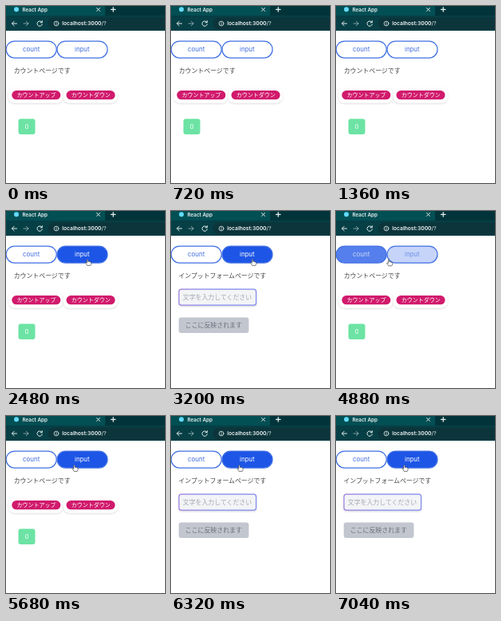
Animation of 199x222 px, one loop 7120 ms. Source, as an HTML page:

```html
<!DOCTYPE html>
<html lang="ja">
<head>
<meta charset="utf-8">
<title>React App</title>
<style>
  html, body { margin: 0; width: 100%; height: 100%; overflow: hidden; background: #fff; }
  svg { display: block; width: 100%; height: 100%; }
  text { font-family: Inter, "Noto Sans CJK JP", "Noto Sans CJK", sans-serif; font-size: 7.9px; }
  .mid { text-anchor: middle; }
  .icon { fill: none; stroke: #e3eeee; stroke-width: 1; stroke-linecap: round; stroke-linejoin: round; }
  .label { font-size: 7px; font-weight: 500; fill: #fff; }
  .pill rect { fill: #1d55e6; stroke: #4070e4; stroke-width: 1.2; }
  .card { fill: #fff; filter: url(#shadow); }
</style>
</head>
<body>
<svg viewBox="0 0 199 222" preserveAspectRatio="none">
  <defs>
    <filter id="shadow" x="-20%" y="-40%" width="140%" height="200%">
      <feDropShadow dx="0" dy="1" stdDeviation="1" flood-color="#000" flood-opacity=".16"/>
    </filter>
    <linearGradient id="edge">
      <stop stop-color="#9a7de0"/><stop offset=".4" stop-color="#7f88ee"/><stop offset="1" stop-color="#7f88ee"/>
    </linearGradient>
  </defs>
  <rect width="199" height="222" fill="#fff"/>

  <g id="browser">
    <rect width="199" height="31" fill="#063f45"/>
    <rect width="124" height="12" fill="#024f54"/>
    <rect x="124" width="75" height="12" fill="#01343a"/>
    <path d="M199 14.5H60a7.5 7.5 0 0 0 0 15H199Z" fill="#0c353b"/>
    <circle cx="13" cy="4.3" r="3" fill="#61dafb"/>
    <text x="20.5" y="6.6" style="font-size:6.3px;font-weight:600" fill="#eef4f4">React App</text>
    <path class="icon" d="M113.5 2.4l4 4m0-4l-4 4"/>
    <path class="icon" d="M131.5 4.4h5.4m-2.7-2.7v5.4" style="stroke-width:1.3"/>
    <path class="icon" d="M13.5 22H7.5m2.7-2.8L7.4 22l2.8 2.8"/>
    <path class="icon" d="M22 22h6m-2.7-2.8L28.1 22l-2.8 2.8" opacity=".55"/>
    <path class="icon" d="M44.8 20.2a3.2 3.2 0 1 0 .5 2.8M45.3 18.6v2.2h-2.2"/>
    <circle class="icon" cx="63" cy="22" r="2.9" style="stroke-width:.8"/>
    <path class="icon" d="M63 21.8v1.7M63 20.4v.1" style="stroke-width:.8"/>
    <text x="70.3" y="24.3" style="font-size:6.7px;font-weight:600" fill="#f1f6f6">localhost:3000<tspan fill="#b8c8c8">/?</tspan></text>
  </g>

  <g class="pill" id="countTab">
    <rect x=".2" y="44.1" width="63" height="21" rx="10.5"/>
    <text class="mid" x="31.7" y="57.4">count</text>
  </g>
  <g class="pill" id="inputTab">
    <rect x="64" y="44.1" width="63" height="21" rx="10.5"/>
    <text class="mid" x="95.3" y="57.4">input</text>
  </g>

  <g id="countPage">
    <text x="9.7" y="84" fill="#444">カウントページです</text>
    <rect class="card" x="3" y="102" width="68" height="19.5" rx="8"/>
    <rect class="card" x="71.5" y="102" width="68" height="19.5" rx="8"/>
    <rect x="7.3" y="106" width="61" height="11.3" rx="5.6" fill="#d11a6c"/>
    <rect x="75.5" y="106" width="61" height="11.3" rx="5.6" fill="#d11a6c"/>
    <text class="label mid" x="38" y="114.2">カウントアップ</text>
    <text class="label mid" x="106.3" y="114.2">カウントダウン</text>
    <rect x="15.5" y="141.5" width="21" height="19.5" rx="3" fill="#6ce3a4"/>
    <text class="mid" x="26" y="154.2" fill="#fff">0</text>
  </g>

  <g id="inputPage">
    <text x="9.4" y="84" fill="#444">インプットフォームページです</text>
    <rect x="10" y="98.2" width="96.5" height="20" rx="3" fill="#f3f4f6" stroke="url(#edge)" stroke-width="1.2" filter="url(#shadow)"/>
    <text x="14.8" y="111" fill="#a4a8b0">文字を入力してください</text>
    <rect x="9.7" y="133.5" width="87.7" height="19.5" rx="3" fill="#c2c6cf"/>
    <text x="17.8" y="146" fill="#6b727e">ここに反映されます</text>
  </g>

  <g id="cursor" stroke-linejoin="round">
    <path id="arrow" d="M0 0V9.4L2.2 7.4L3.7 10.8L5.2 10.1L3.7 6.9H6.7Z" fill="#111" stroke="#fff" stroke-width=".8"/>
    <path id="hand" d="M-.9 .8Q0-.7.9.8V3.6Q2.2 2.7 2.7 4Q4 3.3 4.4 4.6Q5.9 4.2 5.9 5.8Q5.9 8 4.6 9.9H-.4Q-1.5 8-2.9 6.3Q-3.4 4.8-1.9 5.1L-.9 6Z" fill="#fff" stroke="#333" stroke-width=".8"/>
  </g>
</svg>
<script>
const LOOP = 7120, STEP = 80, FADE = 160;
const $ = id => document.getElementById(id);

// Cursor stops: time, x, y
const stops = [
  [1600, 140, 226], [2240, 102, 60.5], [3520, 102, 60.5], [4000, 53.5, 60.5],
  [4640, 53.5, 60.5], [5200, 85.5, 61.5], [LOOP, 85.5, 61.5]
];
// Clicks on the tabs, each toggles the page
const clicks = [3040, 4480, 6000];

function cursorAt(t) {
  if (t < stops[0][0]) return null;
  const i = stops.findIndex(s => s[0] > t);
  const [t0, x0, y0] = stops[i - 1], [t1, x1, y1] = stops[i];
  const p = (t - t0) / (t1 - t0), e = p * p * (3 - 2 * p);
  return { x: x0 + (x1 - x0) * e, y: y0 + (y1 - y0) * e };
}

function tabAt(t) {
  const c = cursorAt(t);
  if (!c || c.y < 44 || c.y > 66 || c.x > 127) return null;
  return c.x < 64 ? "countTab" : "inputTab";
}

// Share of the last FADE ms spent over the tab
function hover(tab, t) {
  let n = 0;
  for (let i = 0; i < 8; i++) n += tabAt(t - i * FADE / 8) === tab;
  return n / 8;
}

function show(id, on) { $(id).style.display = on ? "" : "none"; }

function paintTab(id, amount) {
  const [box, label] = $(id).children;
  const mix = a => Math.round(a + (255 - a) * amount);
  box.style.fillOpacity = amount;
  label.style.fill = `rgb(${mix(64)},${mix(108)},${mix(224)})`;
}

function draw(t) {
  const onInput = clicks.filter(c => c <= t).length % 2 === 1;
  show("countPage", !onInput);
  show("inputPage", onInput);
  for (const id of ["countTab", "inputTab"]) paintTab(id, hover(id, t));

  const c = cursorAt(t), over = tabAt(t);
  show("cursor", c);
  show("hand", over);
  show("arrow", !over);
  if (c) $("cursor").setAttribute("transform", `translate(${c.x} ${c.y}) scale(.8)`);
}

const start = performance.now();
function tick(now) {
  const t = Math.max(0, now - start) % LOOP;
  draw(Math.floor(t / STEP) * STEP);
  requestAnimationFrame(tick);
}
draw(0);
requestAnimationFrame(tick);
</script>
</body>
</html>
```
